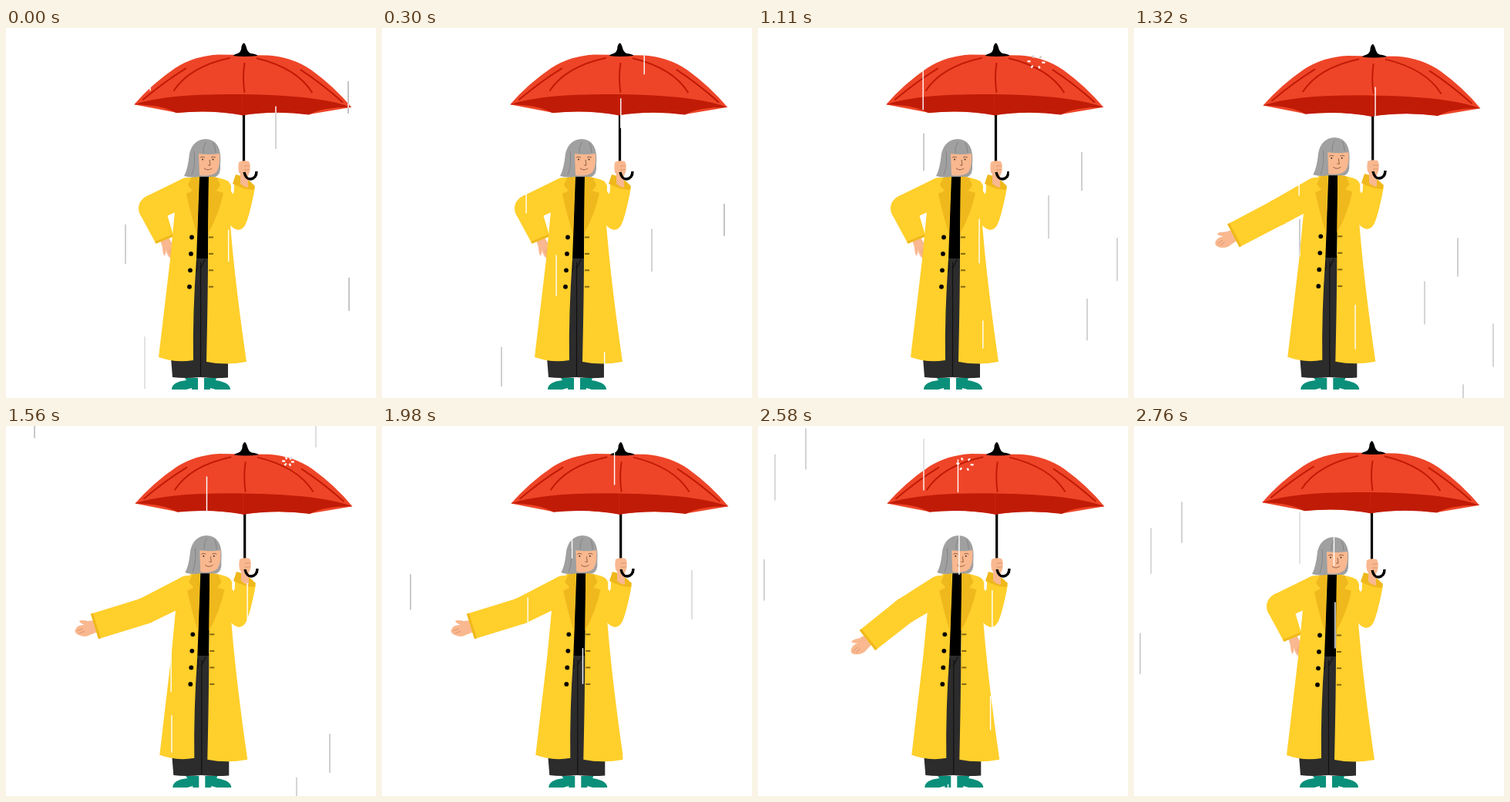
An HTML page with a canvas that plays this animation: 480x480 px, repeating every 2.79 s.

```html
<!DOCTYPE html>
<html lang="en">
<head>
<meta charset="utf-8">
<title>Woman with umbrella in the rain</title>
<style>
  html, body { margin: 0; height: 100%; overflow: hidden; background: #fff; }
  canvas { display: block; }
</style>
</head>
<body>
<canvas id="stage" width="480" height="480"></canvas>
<script>
const ctx = document.getElementById('stage').getContext('2d');
const LOOP = 2790, STEP = 30, FALL = 0.53;
const COAT = '#ffcf2b', SHADE = '#efb81c', SKIN = '#f9b88f', CREASE = '#d98d67', RED = '#ee4528',
      DARK_RED = '#c01b06', HAIR = '#a0a0a0', TEAL = '#0a8f7a', TROUSERS = '#2c2c2c';

let seed = 11;
const random = (low, high) => {
  seed = (seed * 16807) % 2147483647;
  return low + (high - low) * seed / 2147483647;
};

// Streaks on the background: x and bottom at time 0; short ones are darker
const streaks = [
  [444, 111], [350, 157], [155, 306], [445, 367], [180, 468], [427, -183], [287, -283], [466, -260],
  [377, -315], [420, -377], [215, -403], [402, -799], [37, -811], [8, -1141], [22, -1271], [215, -1284], [62, -1311]
].map(([x, y]) => {
  const length = random(42, 72);
  return { x, y, length, grey: 100 + 1.7 * length };
});

// Glints that only show where they cross the figure
const glints = Array.from({ length: 18 }, (_, i) => (
  { x: random(185, 360), y: 370 - 100 * i + random(0, 60), length: random(25, 60) }
));

const splashes = [{ x: 361, y: 44, start: 960 }, { x: 366, y: 46, start: 1530 }, { x: 268.5, y: 49.5, start: 2440 }];

const SHOULDER = [236, 212];
const poses = [
  { elbow: [189, 234], cuff: [206, 275], width: 25, turn: -103 }, // hand on hip
  { elbow: [190, 240], cuff: [142, 278], width: 33, turn: -24 },
  { elbow: [180, 240], cuff: [115, 260], width: 34, turn: 0 }     // reaching out
];

const fill = (color, d) => { ctx.fillStyle = color; ctx.fill(new Path2D(d)); };
const line = (color, width, d) => {
  ctx.strokeStyle = color;
  ctx.lineWidth = width;
  ctx.stroke(new Path2D(d));
};
const dot = (color, x, y, r) => {
  ctx.fillStyle = color;
  ctx.beginPath();
  ctx.arc(x, y, r, 0, 7);
  ctx.fill();
};
const placed = (x, y, drawPart) => {
  ctx.save();
  ctx.translate(x, y);
  drawPart();
  ctx.restore();
};
const ramp = (t, a, b) => {
  const u = Math.min(1, Math.max(0, (t - a) / (b - a)));
  return u * u * (3 - 2 * u);
};
const mix = (a, b, u) => a + (b - a) * u;
const mixPoint = (p, q, u) => [mix(p[0], q[0], u), mix(p[1], q[1], u)];

function armAt(k) {
  const i = Math.min(1, Math.floor(k)), a = poses[i], b = poses[i + 1], u = k - i;
  return {
    elbow: mixPoint(a.elbow, b.elbow, u),
    cuff: mixPoint(a.cuff, b.cuff, u),
    width: mix(a.width, b.width, u),
    turn: mix(a.turn, b.turn, u)
  };
}

// A limb section from p to q with a round start and a straight end
function limb([px, py], [qx, qy], startWidth, endWidth) {
  const angle = Math.atan2(qy - py, qx - px), length = Math.hypot(qx - px, qy - py);
  dot(COAT, px, py, startWidth / 2);
  placed(px, py, () => {
    ctx.rotate(angle);
    fill(COAT, `M0 ${-startWidth / 2}L${length} ${-endWidth / 2}V${endWidth / 2}L0 ${startWidth / 2}Z`);
    line(SHADE, 3, `M${length - 1.5} ${-endWidth / 2}V${endWidth / 2}`);
  });
}

function reachingArm({ elbow, cuff, width, turn }) {
  placed(...cuff, () => {
    ctx.rotate(turn * Math.PI / 180);
    ctx.scale(1, width / 34);
    fill(SKIN, 'M4-8L-9-7Q-17-9-20-7Q-19-4-13-2Q-23-2-25 4Q-27 8-21 11Q-12 15-6 11L4 7Z');
    line(CREASE, 0.8, 'M-23 6L-15 3M-20 9L-13 6');
  });
  limb(SHOULDER, elbow, 36, 34);
  limb(elbow, cuff, 34, width);
}

function umbrella() {
  line('#000', 3.2, 'M0 108V180');
  for (const side of [-1, 1]) {
    ctx.save();
    ctx.rotate(0.013);
    ctx.scale(side, 1);
    fill(RED, 'M-1 35H32Q64 37 88 53Q118 74 141 101L86 111Q42 106-1 113Z');
    fill(DARK_RED, 'M141 101Q104 101 86 111.5Q42 106-1 113.5V86Q100 86 141 101Z');
    line(DARK_RED, 2, 'M17 39Q70 51 90 83M74 53Q101 70 130 95');
    ctx.restore();
  }
  line(DARK_RED, 2, 'M1 45Q-2 65 1 84');
  fill('#000', 'M-3 24Q0 15 3 24Q5 32 9 33Q17 34 18 36Q0 38-14 36Q-12 34-8 33Q-3 31-3 24Z');
}

function head() {
  fill(HAIR, 'M259 144Q242 145 238 163Q236 183 231 192Q240 195 250 193H272Q279 190 278 178Q281 145 259 144Z');
  fill(SKIN, 'M250 163Q263 165 277 163Q278 180 273 187Q266 193 251 191Z');
  line('#858585', 1, 'M259 148Q255 155 256 162M269 149Q272 155 272 162M244 160Q246 177 241 191');
  line('#7a4a34', 0.8, 'M252 168Q255 166 258 168M266 168Q269 166 272 168M264 171L265 178H262M257 182Q262 186 267 182');
  for (const x of [255, 268.5]) dot('#222', x, 170.5, 0.9);
}

function body() {
  fill(TROUSERS, 'M244 296H264L288 428V453.5Q270 455 252 453Q232 455 216 453L214 428Z');
  line('#111', 1.2, 'M252.5 304V452M246 299Q249 309 247 316M258 300L253 311');
  fill(TEAL, 'M215 469Q215 459 234 457L232 454H249V469H241V467L234 469ZM257 454H273L272 457Q291 460 291 469H272L265 467V469H257Z');
  fill('#000', 'M250 190Q256 193 264 190L262 299H246Z');
  fill(COAT, 'M238 194L251 192L247 300Q242 370 243 431Q220 435 198 427L213 300L220 228Z');
  fill(COAT, 'M263 192L278 195Q290 197 292 205L291 255Q297 330 312 433Q285 438 260 433Q262 340 262 299Z');
  fill(SHADE, 'M240 195L250 192L248 267Q240 244 234 215L242 211L236 204Z');
  fill(SHADE, 'M263 192L274 194L278 204L273 211L282 214Q276 242 262 267Z');
  for (let i = 0; i < 4; i++) {
    const y = 271.5 + 21.4 * i;
    dot('#000', 241 - i, y, 2.9);
    line('#87670f', 2, `M263 ${y}H269`);
  }
}

function holdingArm() {
  fill(COAT, 'M290 206Q296 225 296 204L299 191L323 207Q318 234 313 249Q309 262 301 262Q293 260 290 254Z');
  fill(SHADE, 'M298 190Q311 192 323 205L321 210Q307 209 294 202Z');
  fill(SKIN, 'M302 174Q307 171 315 173Q318 178 316 187L314 192L314 207Q308 206 304 202L304 190Q300 186 302 174Z');
  line(CREASE, 0.8, 'M309 179H316M309 184H316');
  line('#000', 3.4, 'M309 187Q311 196 317 196Q325 195 325 186');
}

// White over the figure, grey over the empty background
function rain(t, onFigure) {
  ctx.globalCompositeOperation = onFigure ? 'source-atop' : 'destination-over';
  for (const { x, y, length, grey } of onFigure ? [...streaks, ...glints] : streaks) {
    const bottom = y + FALL * t;
    line(onFigure ? '#fff' : `rgb(${grey},${grey},${grey})`, 1.4, `M${x} ${bottom - length}V${bottom}`);
  }
  for (const { x, y, start } of splashes) {
    const u = (t - start) / 270;
    if (u < 0 || u >= 1) continue;
    const near = 3 + 8 * u;
    for (let i = 0; i < 6; i++) {
      const a = i * Math.PI / 3 + 0.1, dx = Math.cos(a), dy = 0.8 * Math.sin(a);
      line(onFigure ? '#fff' : '#ccc', 2.2,
        `M${x + near * dx} ${y + near * dy}L${x + (near + 4) * dx} ${y + (near + 4) * dy}`);
    }
  }
  ctx.globalCompositeOperation = 'source-over';
}

function draw(t) {
  const reach = 2 * (ramp(t, 1200, 1380) - ramp(t, 2490, 2670));
  const lean = Math.min(1, reach);
  ctx.clearRect(0, 0, 480, 480);

  placed(308.5 + 1.2 * lean, 1.4 * lean, umbrella);
  reachingArm(armAt(reach));
  placed(1.3 * lean, -2.8 * lean, () => {
    ctx.scale(1, 1 + 0.006 * lean);
    body();
    head();
  });
  placed(lean, -lean, holdingArm);

  rain(t, true);
  rain(t, false);
}

const begin = performance.now();
function tick() {
  const t = (performance.now() - begin) % LOOP;
  draw(Math.floor(t / STEP) * STEP);
  requestAnimationFrame(tick);
}
tick();
</script>
</body>
</html>
```
